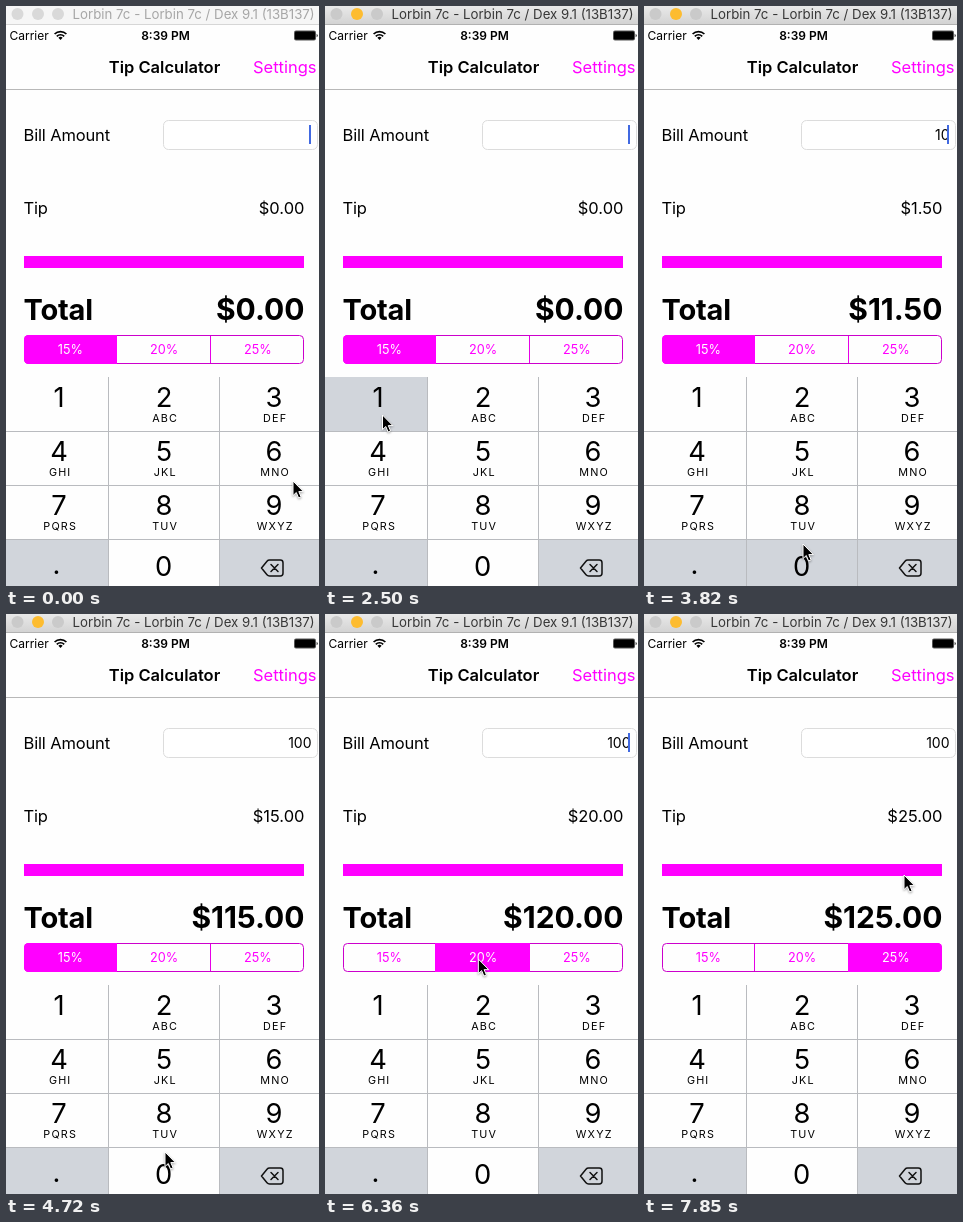
An HTML page for the animation above (8 s loop, 313 by 580 pixels).

```html
<!DOCTYPE html>
<html lang="en">
<head>
<meta charset="utf-8">
<title>Tip Calculator</title>
<style>
html, body { margin: 0; width: 100%; height: 100%; overflow: hidden; background: #fefefe; }
svg { display: block; width: 313px; height: 580px; }
text { font-family: Inter, "Liberation Sans", sans-serif; font-size: 16.5px; white-space: pre; }
.mid { text-anchor: middle; }
.end { text-anchor: end; }
.pink { fill: #f0f; }
.window { font-size: 13.25px; }
.status { font-size: 12px; }
.label { letter-spacing: -.15px; }
.amount { font-size: 14px; }
.big { font-size: 29px; font-weight: 700; letter-spacing: -.2px; }
.sum { font-size: 30px; font-weight: 700; }
.seg { font-size: 12.7px; }
.digit { font-size: 27.3px; }
.letters { font-size: 10.8px; letter-spacing: 1.2px; }
</style>
</head>
<body>
<svg id="stage" viewBox="0 0 313 580">
  <defs>
    <linearGradient id="chrome" x2="0" y2="1">
      <stop stop-color="#e9e9e9"/><stop offset="1" stop-color="#d3d3d3"/>
    </linearGradient>
    <clipPath id="pill"><rect x="18" y="329" width="280" height="29" rx="4.5"/></clipPath>
  </defs>
  <rect width="313" height="580" fill="#fefefe"/>

  <rect id="bar" width="313" height="18"/>
  <rect id="barLine" y="18" width="313" height="1"/>
  <g id="lights"></g>
  <text id="windowTitle" class="window" x="66.5" y="13">Lorbin 7c - Lorbin 7c / Dex 9.1 (13B137)</text>

  <text class="status" x="3.5" y="33.5">Carrier</text>
  <g fill="none" stroke="#000" stroke-width="1.7">
    <path d="M48.6 28a8.3 8.3 0 0 1 11.8 0M50.8 30.3a5.2 5.2 0 0 1 7.4 0"/>
    <path d="M54.5 34l-2.1-2.2a3 3 0 0 1 4.2 0z" fill="#000" stroke="none"/>
  </g>
  <text class="status mid" x="159.5" y="33.5" font-weight="600">8:39 PM</text>
  <rect x="288" y="24.5" width="22" height="10" rx="2" fill="#555"/>
  <rect x="289" y="25.5" width="20" height="8" rx="1"/>
  <path d="M310.7 27.7q2 1.8 0 3.6z"/>

  <text class="mid" x="158.5" y="67" font-weight="600">Tip Calculator</text>
  <text class="end pink" x="310.5" y="67">Settings</text>
  <rect y="83" width="313" height="1" fill="#b8b8b8"/>

  <text class="label" x="17.5" y="134.5">Bill Amount</text>
  <rect x="157.5" y="114.5" width="154" height="29" rx="5" fill="#fff" stroke="#dcdcdc"/>
  <text id="amount" class="end amount" x="305.5" y="133.5"></text>
  <rect id="caret" x="303" y="119" width="2" height="19" fill="#4169e1"/>
  <text class="label" x="17.5" y="207.5">Tip</text>
  <text id="tip" class="end" x="298.5" y="207.5"></text>
  <rect class="pink" x="18" y="250" width="280" height="12"/>
  <text class="big" x="17.5" y="313.5">Total</text>
  <text id="total" class="end sum" x="298.5" y="313.5"></text>

  <g id="segments"></g>
  <g id="keys"></g>
  <path id="cursor" d="M0 0V14.6L3.3 11.5 5.6 17 8.1 15.9 5.8 10.6H10.4Z" stroke="#fff" stroke-width="1"
    style="filter:drop-shadow(0 1px 1px rgba(0,0,0,.35))"/>
</svg>
<script>
const LOOP = 8000;
const $ = id => document.getElementById(id);

function add(parent, tag, attrs, text) {
  const el = document.createElementNS("http://www.w3.org/2000/svg", tag);
  for (const k in attrs) el.setAttribute(k, attrs[k]);
  if (text) el.textContent = text;
  return parent.appendChild(el);
}
const set = (el, k, v) => el.setAttribute(k, v);
const show = (el, on) => set(el, "visibility", on ? "visible" : "hidden");

const lights = [11.5, 32, 52].map(cx => add($("lights"), "circle", { cx, cy: 8, r: 6 }));

// Segmented control: pressed tint below the outline, chosen fill above it
const rates = [15, 20, 25];
const segX = [18, 110, 204, 298];
function fillSegments(fill) {
  const box = add($("segments"), "g", { "clip-path": "url(#pill)" });
  return rates.map((_, i) =>
    add(box, "rect", { x: segX[i], y: 329, width: segX[i + 1] - segX[i] + 1, height: 29, fill }));
}
const pressedSegs = fillSegments("#fdd2fd");
add($("segments"), "rect", {
  x: 18.5, y: 329.5, width: 279, height: 28, rx: 4, fill: "none", stroke: "#cc00cc"
});
for (const x of segX.slice(1, 3)) {
  add($("segments"), "rect", { x, y: 330, width: 1, height: 27, fill: "#e600e6" });
}
const chosenSegs = fillSegments("#f0f");
const segText = rates.map((r, i) =>
  add($("segments"), "text", { class: "seg mid", x: 64.3 + 93.8 * i, y: 348 }, r + "%"));

// Keypad
const colX = [0, 103, 214, 313];
const mids = [53, 158, 268];
const letters = ["", "ABC", "DEF", "GHI", "JKL", "MNO", "PQRS", "TUV", "WXYZ"];
const GREY = "#d1d5db", WHITE = "#fefefe", RULE = "#b9bbbf";
const pads = [];
for (let i = 0; i < 12; i++) {
  const c = i % 3, r = Math.floor(i / 3);
  pads.push(add($("keys"), "rect", {
    x: colX[c], y: 371 + 54 * r, width: colX[c + 1] - colX[c], height: 55,
    fill: i === 9 || i === 11 ? GREY : WHITE
  }));
}
for (let r = 1; r < 4; r++) add($("keys"), "rect", { x: 0, y: 371 + 54 * r, width: 313, height: 1, fill: RULE });
for (const x of [102, 213]) add($("keys"), "rect", { x, y: 371, width: 1, height: 209, fill: RULE });
letters.forEach((s, i) => {
  const x = mids[i % 3], y = 401 + 54 * Math.floor(i / 3);
  add($("keys"), "text", { class: "digit mid", x, y }, String(i + 1));
  add($("keys"), "text", { class: "letters mid", x: x + 1.2, y: y + 15 }, s);
});
add($("keys"), "text", { class: "digit mid", x: 50.5, y: 568 }, ".");
add($("keys"), "text", { class: "digit mid", x: 157.5, y: 570 }, "0");
add($("keys"), "path", {
  d: "M255.5 562L261 555.2Q262 554 263.6 554H274.3Q277 554 277 556.7V567.3Q277 570 274.3 570H263.6Q262 570 261 568.8ZM265 558.5l7 7M272 558.5l-7 7",
  fill: "none", stroke: "#111", "stroke-width": 1.5, "stroke-linejoin": "round", "stroke-linecap": "round"
});

// Pointer path: time, x, y
const path = [
  [0, 287, 475], [140, 286, 482], [730, 266, 554], [880, 266, 554],
  [1620, 187, 450], [2060, 59, 412], [2350, 57.5, 409], [2800, 57.5, 409],
  [3530, 159, 538], [4870, 159, 538], [5320, 136, 351], [5460, 136, 351],
  [5910, 141, 350], [6210, 141, 350], [6510, 166, 340], [6950, 246, 334],
  [7400, 246, 334], [7850, 260, 261], [LOOP, 260, 261]
];

// The pointer advances in steps of slightly under 150 ms.
function snap(t) {
  const [from, step] = t < 4115 ? [0, 147] : [4120, 149.2];
  return from + Math.max(0, Math.floor((t - from + 8) / step)) * step;
}

function pointer(t) {
  const i = Math.max(1, path.findIndex(p => p[0] >= t));
  const [a, b] = [path[i - 1], path[i]];
  const k = (t - a[0]) / (b[0] - a[0]);
  return [1, 2].map(n => a[n] + (b[n] - a[n]) * k);
}

const fades = [140, 1030, 2060, 3090, 4570, 5610, 6660, 7700];
function caretAlpha(t) {
  const age = t - fades.filter(f => f <= t).pop();
  return age < 145 ? .5 : age < 438 ? 0 : 1;
}

const within = (t, a, b) => t >= a && t < b;
const after = (t, times) => times.filter(x => t >= x).length;
const money = v => "$" + v.toFixed(2);

function draw(t) {
  const active = t >= 2350;
  set($("bar"), "fill", active ? "url(#chrome)" : "#f6f6f6");
  set($("barLine"), "fill", active ? "#b1b1b1" : "#d6d6d6");
  set($("windowTitle"), "fill", active ? "#363636" : "#a6a6a6");
  lights.forEach((el, i) => set(el, "fill", !active ? "#d9d9d9" : i === 1 ? "#fdbc30" : "#cacaca"));

  const bill = ["", "1", "10", "100"][after(t, [2650, 3820, 4120])];
  const tip = bill * rates[after(t, [6060, 7100])] / 100;
  $("amount").textContent = bill;
  $("tip").textContent = money(tip);
  $("total").textContent = money(+bill + tip);
  set($("caret"), "opacity", caretAlpha(t));

  const chosen = after(t, [6210, 7250]);
  const pressed = within(t, 5910, 6210) ? 1 : within(t, 6950, 7250) ? 2 : -1;
  rates.forEach((_, i) => {
    show(pressedSegs[i], i === pressed);
    show(chosenSegs[i], i === chosen);
    set(segText[i], "fill", i === chosen ? "#fff" : "#f0f");
  });

  set(pads[0], "fill", within(t, 2500, 2650) ? GREY : WHITE);
  set(pads[10], "fill", within(t, 3680, 3970) ? GREY : WHITE);

  set($("cursor"), "transform", `translate(${pointer(snap(t))})`);
}

const start = performance.now();
function tick() {
  draw((performance.now() - start) % LOOP);
  requestAnimationFrame(tick);
}
tick();
</script>
</body>
</html>
```
